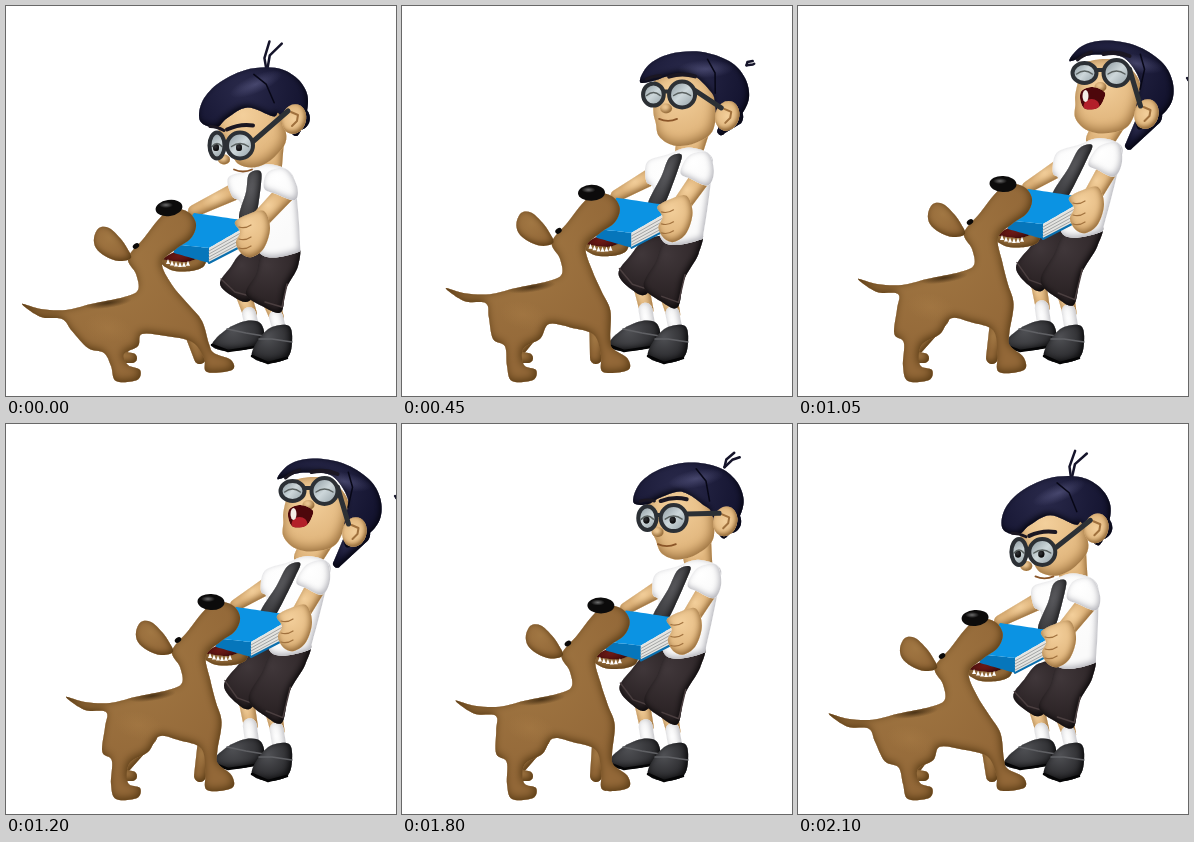
These frames come from a looping animation (390x390 px, 2.25 s). An HTML page with a canvas:

```html
<!DOCTYPE html>
<html lang="en">
<head>
<meta charset="utf-8">
<title>Boy and dog with a book</title>
<style>
html, body { margin: 0; width: 100%; height: 100%; overflow: hidden; background: #fff; }
canvas { display: block; }
</style>
</head>
<body>
<canvas id="stage" width="390" height="390"></canvas>
<script>
const c = document.getElementById('stage').getContext('2d');
c.lineCap = c.lineJoin = 'round';

const STEP = 150, COUNT = 15;
// tones: light, base, rim
const SKIN = ['#f3cf9b', '#e0b57c', '#8a6130'], FUR = ['#a17743', '#936838', '#553812'];
const SHIRT = ['#fff', '#fafafa', '#adadb4'], SHORTS = ['#40373a', '#2a2224', '#080607'];
const SHOE = ['#505155', '#29292c', '#060607'], SOCK = ['#fff', '#f4f4f4', '#b0b0b6'];
const HAIR = ['#29294a', '#141430', '#03030c'], TIE = ['#5c5c60', '#3d3d40', '#171719'];
const MOUTH = ['#6d1a16', '#4a0d0c', '#1c0303'], CREASE = '#a0713e', FRAME = '#2c3035';

const clamp = (v, lo = 0, hi = 1) => Math.min(hi, Math.max(lo, v));
const pairs = s => s.trim().split(/\s+/).map(q => q.split(',').map(Number));

// Motion: p is the lean from 0 to 1, sway the arc of the head on its way back.
let p, sway, nod, laugh;
function pose(i) {
  const k = clamp(Math.min(i - 1, COUNT - i) / 4.6);
  p = Math.sin(Math.PI / 2 * k);
  sway = Math.sin(Math.PI * clamp((i - 10) / 5));
  nod = 3 * p - 1 - 1.55 * sway;
  laugh = clamp(Math.min(i - 3, 10 - i) / 2);
}

// How points follow the lean: all the way, with planted paws, with planted shoes.
const lift = ([x, y]) => [x + 42 * p, y - 24 * p];
const dogMove = ([x, y]) => {
  const top = 315 - 50 * clamp((x - 90) / 80), w = clamp((355 - y) / (355 - top));
  return [x + 44 * p * w, y - 25 * p * Math.sqrt(w)];
};
const boyMove = ([x, y]) => {
  const w = clamp((330 - y) / 165) ** 2;
  return [x + 40 * p * w, y - p * (18 * clamp((330 - y) / 60) + 8 * w)];
};
const turn = (a, [ox, oy]) => ([x, y]) =>
  [ox + x * Math.cos(a) - y * Math.sin(a), oy + x * Math.sin(a) + y * Math.cos(a)];

// closed curve through the points; bend 0 gives straight sides
function closed(v, bend = 1 / 6) {
  const path = new Path2D(), at = i => v[(i + v.length) % v.length];
  path.moveTo(...v[0]);
  v.forEach((a, i) => {
    const z = at(i - 1), b = at(i + 1), d = at(i + 2);
    path.bezierCurveTo(a[0] + (b[0] - z[0]) * bend, a[1] + (b[1] - z[1]) * bend,
      b[0] - (d[0] - a[0]) * bend, b[1] - (d[1] - a[1]) * bend, ...b);
  });
  path.closePath();
  return path;
}

function oval([x, y], rx, ry, rot = 0) {
  const path = new Path2D();
  path.ellipse(x, y, rx, ry, rot, 0, 7);
  return path;
}

// soft solid, lit from the upper left, darker along the lower right rim
function solid(path, [light, base, rim], [x, y], size, blur = 6) {
  const g = c.createRadialGradient(x, y, 0, x, y, size);
  g.addColorStop(0, light);
  g.addColorStop(.6, base);
  c.fillStyle = g;
  c.fill(path);
  const ring = new Path2D();
  ring.rect(-100, -100, 600, 600);
  ring.addPath(path);
  c.save();
  c.clip(path);
  c.shadowColor = rim;
  c.shadowBlur = blur;
  c.shadowOffsetX = -1.5;
  c.shadowOffsetY = -2;
  c.fill(ring, 'evenodd');
  c.restore();
}

function blob(v, tone, blur) {
  const [x0, x1, y0, y1] = [0, 1].flatMap(k =>
    [Math.min(...v.map(q => q[k])), Math.max(...v.map(q => q[k]))]);
  const path = closed(v);
  solid(path, tone, [x0 + (x1 - x0) * .4, y0 + (y1 - y0) * .3], Math.max(x1 - x0, y1 - y0), blur);
  return path;
}

const ball = (at, rx, ry, tone, rot) => solid(oval(at, rx, ry, rot), tone, at, rx * 2, 4);

// tapered tube with round ends
function limb(a, ra, b, rb, tone) {
  const t = Math.atan2(b[1] - a[1], b[0] - a[0]), path = new Path2D();
  path.arc(...a, ra, t + Math.PI / 2, t - Math.PI / 2);
  path.arc(...b, rb, t - Math.PI / 2, t + Math.PI / 2);
  path.closePath();
  solid(path, tone, [(a[0] + b[0]) / 2 - 3, (a[1] + b[1]) / 2 - 3], 25);
}

function line(v, color, width) {
  c.strokeStyle = color;
  c.lineWidth = width;
  c.beginPath();
  c.moveTo(...v[0]);
  v.slice(1).forEach(q => c.lineTo(...q));
  c.stroke();
}

// shallow arc around a centre; positive sag hangs down
function arc([x, y], half, sag, color, width, slope = 0) {
  c.strokeStyle = color;
  c.lineWidth = width;
  c.beginPath();
  c.moveTo(x - half, y - slope);
  c.quadraticCurveTo(x, y + sag * 2, x + half, y + slope);
  c.stroke();
}

function flat(v, fill) {
  c.fillStyle = fill;
  c.fill(closed(v, 0));
}

function glow([x, y], rx, ry, rot, rgb, alpha) {
  c.save();
  c.translate(x, y);
  c.rotate(rot);
  c.scale(rx, ry);
  const g = c.createRadialGradient(0, 0, 0, 0, 0, 1);
  g.addColorStop(0, `rgba(${rgb},${alpha})`);
  g.addColorStop(1, `rgba(${rgb},0)`);
  c.fillStyle = g;
  c.fillRect(-1, -1, 2, 2);
  c.restore();
}

const dogBody = pairs(`16,298 35,303 60,304 85,298 118,291 132,284 130,268 122,252 138,232
  152,214 165,203 182,206 190,218 185,232 170,243 156,257 166,279 182,298 196,315 203,338
  208,347 225,354 226,364 201,366 198,352 186,336 160,330 136,328 132,340 118,348 122,359
  134,364 131,374 110,375 105,360 98,347 82,342 66,325 56,313 35,311`);
const dogEar = pairs('88,232 93,222 103,222 114,232 121,242 125,252 113,255 99,250 90,242');
const dogJaw = pairs('154,254 181,256 199,249 198,260 185,265 165,264');
const dogGum = pairs('156,254 172,245 194,244 196,252 180,259 164,259');
const shirt = pairs('222,172 240,165 262,158 284,166 290,185 294,236 290,247 256,249 238,212 234,196 226,190');
const sleeve = pairs('262,166 280,163 291,180 289,194 270,188 258,182');
const tie = pairs('243,168 254,165 255,178 249,215 241,219 233,211 240,186');
const shortsLeft = pairs('238,246 268,244 258,275 243,295 228,291 214,278 224,262');
const shortsRight = pairs('258,246 291,239 292,260 280,283 275,306 258,301 240,288 250,268');
const shoeLeft = pairs('206,339 221,323 240,315 254,317 258,330 249,341 222,345');
const shoeRight = pairs('246,350 253,333 266,321 283,320 286,336 281,352 262,357');
const hand = pairs('229,216 243,208 258,205 264,222 258,242 246,251 236,248 230,237 234,226');
const book = pairs('188,207 236,214 203,242 166,238 168,247 203,257 232,242 234,224');
// head outlines are relative to the ear
const face = pairs('-77,-22 -76,-5 -73,11 -69,20 -63,33 -47,39 -27,33 -11,15 -18,-25 -48,-37');
const hair = pairs(`-92,-17 -87,-35 -68,-50 -38,-58 -8,-54 10,-41 18,-22 13,-2 0,17 -9,7 -14,-9`);
const fringe = pairs('-20,-14 -43,-28 -65,-22 -78,-15');

function lens(at, rx, ry) {
  const [x, y] = at, glass = oval(at, rx, ry);
  const g = c.createLinearGradient(x - rx, y - ry, x + rx, y + ry);
  g.addColorStop(0, '#849198');
  g.addColorStop(.5, '#cdd7da');
  g.addColorStop(1, '#8f9ca2');
  c.fillStyle = g;
  c.fill(glass);
  if (nod < .5) ball([x - 1, y + 2], 3, 3.5, SHOE);
  arc([x, y + 1], rx * .65, -3, '#59605f', 1.5);
  c.strokeStyle = FRAME;
  c.lineWidth = 4;
  c.stroke(glass);
}

function openMouth([x, y]) {
  const path = closed(pairs('-11,0 0,-4 12,1 11,9 5,17 -7,18 -12,10').map(q => [x + q[0], y + q[1] * laugh]));
  c.save();
  c.clip(path);
  c.fillStyle = '#4d070b';
  c.fill(path);
  c.fillStyle = '#b3202a';
  c.fill(oval([x - 1, y + 15 * laugh], 8, 7 * laugh));
  c.fillStyle = '#f3eee6';
  c.fill(oval([x - 7, y + 5 * laugh], 3, 6 * laugh));
  c.restore();
}

const earSpot = () => [288 + 59 * p - 16 * sway + 1.5 * laugh, 113 - 5 * p - 12 * sway];

// The skull tilts about the ear while the features slide over the face.
function drawHead() {
  const ear = earSpot(), tilt = turn(.21 * nod, ear);
  const near = [ear[0] - 52 + 5 * nod + 3 * nod ** 2, ear[1] - 1 - 25 * nod + 2.5 * nod ** 2];
  const far = [near[0] - 26 - 3 * nod, near[1]];
  const by = (dx, dy) => [near[0] + dx, near[1] + dy];

  const nape = clamp(nod, 0, 2);
  limb(tilt([4, 0]), 12, tilt([-3, 18 * nape]), 4, HAIR);
  const spin = turn(.47 * nod, ear), tuft = clamp(18 - 12 * nod, 0, 30) / 24;
  for (const k of [-1, 1])
    line([spin([-3, -54]), spin([-2 + 5 * tuft + 3 * k, -54 - 11 * tuft]),
      spin([-3 + (17 + 4 * k) * tuft, -54 - (18 - 3 * k) * tuft])], '#15142a', 2.5);

  blob(face.map(tilt), SKIN, 12);
  ball(by(-16, 14), 6, 5, SKIN);
  const mouth = by(-6 - 9 * nod, 26 - 2 * nod ** 2);
  if (laugh) openMouth(mouth);
  else arc(mouth, 9, 2, '#8a5528', 1.8);

  const edge = fringe.map(([x, y]) => [x, y - 7 * nod]);
  const cap = blob([...hair, ...edge].map(tilt), HAIR);
  c.save();
  c.clip(cap);
  glow(tilt([-30, -42]), 28, 9, -.2 + .2 * nod, '105,105,150', .5);
  c.restore();
  line([[-30, -52], [-20, -40], [-16, -20]].map(tilt), '#070716', 1.5);

  ball(ear, 12, 15, SKIN, .25);
  line([[-3, -7], [4, -4], [3, 2], [-2, 7]].map(([x, y]) => [ear[0] + x, ear[1] + y]), CREASE, 2);
  arc(by(0, -18), 13, -2, '#1b1722', 4, -1 + nod);
  arc([far[0], far[1] - 17], 7, -1, '#1b1722', 3, -2 * nod);
  line([by(13, -4), [ear[0] - 6, ear[1] - 8]], FRAME, 5);
  line([far, near].map(([x, y]) => [x, y - 3]), FRAME, 4);
  lens(far, 9 + 1.5 * nod, 12 - nod);
  lens(near, 13, 13);
}

function drawLegs() {
  const at = (x, y) => boyMove([x, y]);
  limb(at(236, 284), 8, at(244, 308), 7, SKIN);
  limb(at(264, 292), 9, at(271, 312), 7, SKIN);
  limb(at(243, 308), 7, [247, 324], 7, SOCK);
  limb(at(270, 311), 7, [274, 326], 7, SOCK);
  for (const shoe of [shoeLeft, shoeRight]) {
    blob(shoe, SHOE);
    line([shoe[0], shoe[6], shoe[5]], '#050506', 2.5);
    line([shoe[1], [shoe[2][0], shoe[2][1] + 12], shoe[4]], '#606165', 1.5);
  }
  for (const leg of [shortsLeft, shortsRight]) {
    const v = leg.map(boyMove);
    blob(v, SHORTS);
    line(v.slice(3, 6).map(([x, y]) => [x + 1, y - 5]), '#4b3f40', 1.5);
  }
}

function drawBook() {
  const [a, b, d, e, f, g, h, k] = book.map(lift);
  flat([e, d, g, f], '#0676bb');
  flat([a, b, k, d, e], '#0b93e3');
  flat([d, k, h, g], '#e4e4e1');
  const between = (u, v, w) => [u[0] + (v[0] - u[0]) * w, u[1] + (v[1] - u[1]) * w];
  for (let w = .2; w < .9; w += .2) line([between(d, g, w), between(k, h, w)], '#a3a5a5', 1);
  line([g, h], '#0a6fae', 2);
}

function drawJaw() {
  blob(dogGum.map(lift), MOUTH);
  blob(dogJaw.map(lift), FUR);
  for (let x = 160; x < 184; x += 4) {
    const y = 256 + 3 * Math.sin((x - 160) / 8);
    flat([[x, y + 2], [x + 2, y - 3], [x + 4, y + 2]].map(lift), '#fff');
  }
}

function drawDog() {
  const at = (x, y) => dogMove([x, y]);
  const path = blob(dogBody.map(dogMove), FUR, 9);
  c.save();
  c.clip(path);
  glow(at(102, 297), 24, 5, -.15, '45,28,8', .7);
  glow(at(168, 270), 14, 24, -.4, '178,132,76', .3);
  glow(at(102, 322), 24, 14, .2, '178,132,76', .3);
  c.restore();
  c.fillStyle = '#0b0908';
  c.fill(oval(lift([130, 240]), 3.5, 2.5, -.6));
  blob(dogEar.map(lift), FUR);
  const nose = lift([163, 202]);
  c.fillStyle = '#0c0b0b';
  c.fill(oval(nose, 13.5, 8, -.15 + .2 * p));
  glow([nose[0] - 3, nose[1] - 3], 7, 3, 0, '150,150,150', .7);
}

function draw() {
  c.fillStyle = '#fff';
  c.fillRect(0, 0, 390, 390);

  drawLegs();
  limb(boyMove([236, 182]), 9, lift([188, 205]), 6, SKIN);
  limb(boyMove([262, 160]), 14, turn(.21 * nod, earSpot())([-30, 16]), 16, SKIN);
  blob(shirt.map(boyMove), SHIRT);
  blob(tie.map(boyMove), TIE);
  drawHead();

  limb(dogMove([120, 328]), 11, [114, 348], 6, FUR);
  limb([113, 351], 6, [126, 352], 5, FUR);
  limb(dogMove([188, 328]), 9, [194, 352], 6, FUR);
  drawJaw();
  drawBook();
  drawDog();

  limb(boyMove([280, 186]), 10, lift([250, 218]), 9, SKIN);
  blob(sleeve.map(boyMove), SHIRT);
  blob(hand.map(lift), SKIN);
  for (const y of [220, 232, 241]) arc(lift([239, y]), 6, 1.5, CREASE, 1.2, -1);
}

function tick(now) {
  pose(Math.floor(now / STEP) % COUNT);
  draw();
  requestAnimationFrame(tick);
}
pose(0);
draw();
requestAnimationFrame(tick);
</script>
</body>
</html>
```
